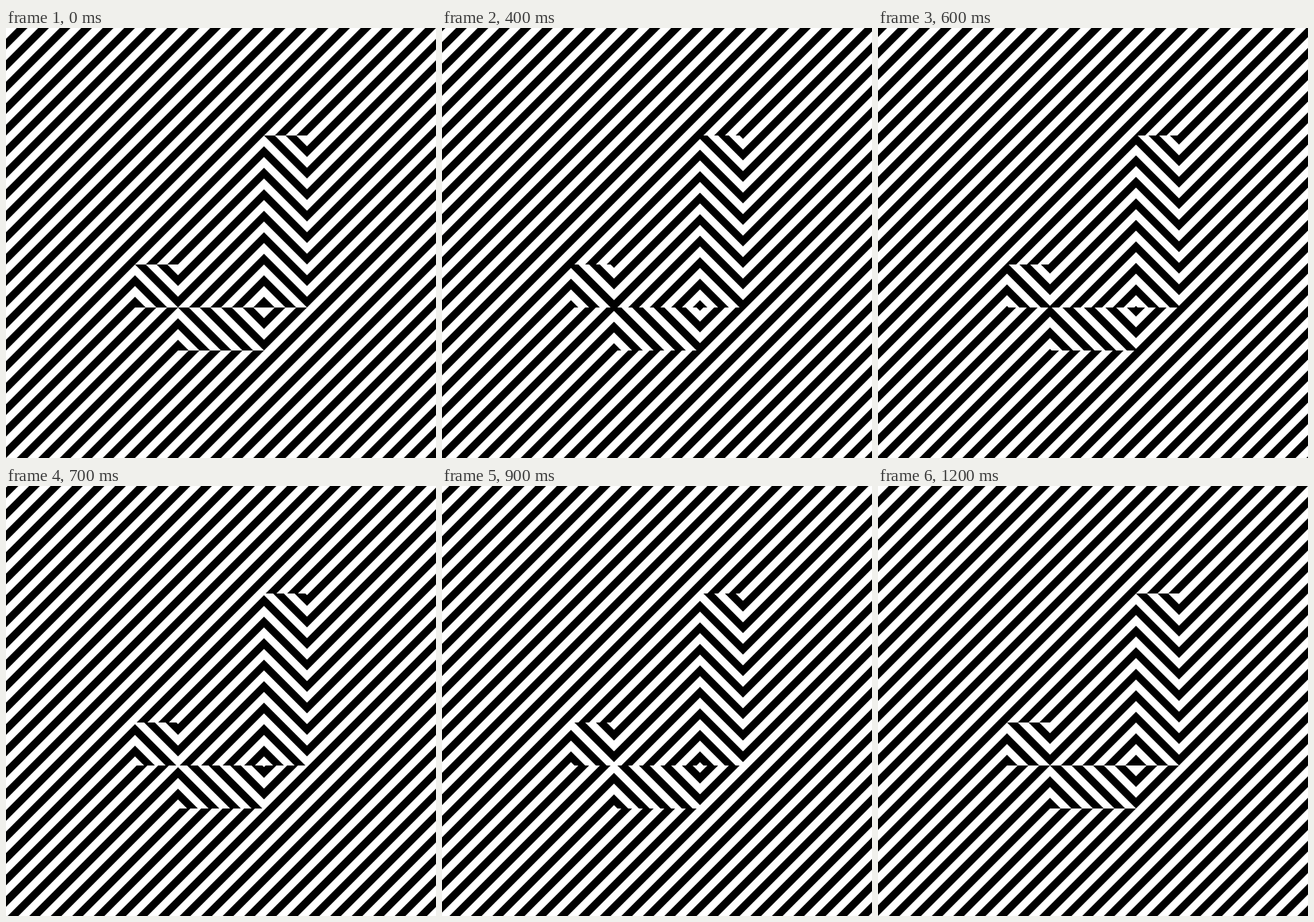
An HTML page with a canvas that plays this animation: 600x600 px, repeating every 1300 ms.

```html
<!DOCTYPE html>
<html lang="en">
<head>
<meta charset="utf-8">
<title>Stripes</title>
<style>
  html, body { margin: 0; width: 100%; height: 100%; overflow: hidden; background: #fff; }
  canvas { display: block; }
</style>
</head>
<body>
<canvas id="stage" width="600" height="600"></canvas>
<script>
const SIZE = 600, PERIOD = 30, BAND = PERIOD / 2;
const LOOP = 1300, STEP = 100, STEPS = 11;
const ctx = document.getElementById('stage').getContext('2d');

// Region where the stripes run the other way.
const hook = new Path2D();
hook.rect(360, 150, 60, 240);
hook.rect(180, 330, 60, 60);
hook.rect(240, 390, 120, 60);

function ease(p) {
  const a = p ** 1.7, b = (1 - p) ** 1.7;
  return a / (a + b);
}

function drawStripes(shift) {
  ctx.fillStyle = '#fff';
  ctx.fillRect(0, 0, SIZE, SIZE);
  ctx.fillStyle = '#000';
  ctx.beginPath();
  for (let x = shift + BAND - 2 * PERIOD; x < 2 * SIZE; x += PERIOD) {
    ctx.moveTo(x, 0);
    ctx.lineTo(x + BAND, 0);
    ctx.lineTo(x + BAND - SIZE, SIZE);
    ctx.lineTo(x - SIZE, SIZE);
    ctx.closePath();
  }
  ctx.fill();
}

function draw(time) {
  // The first pose is held for one extra step.
  const step = Math.max(0, Math.floor((time % LOOP) / STEP) - 1);
  const shift = PERIOD * ease(step / STEPS);
  drawStripes(shift);
  ctx.save();
  ctx.clip(hook);
  ctx.translate(SIZE, 0);
  ctx.scale(-1, 1);
  drawStripes(shift);
  ctx.restore();
}

const start = performance.now();
function tick() {
  draw(performance.now() - start);
  requestAnimationFrame(tick);
}
tick();
</script>
</body>
</html>
```
